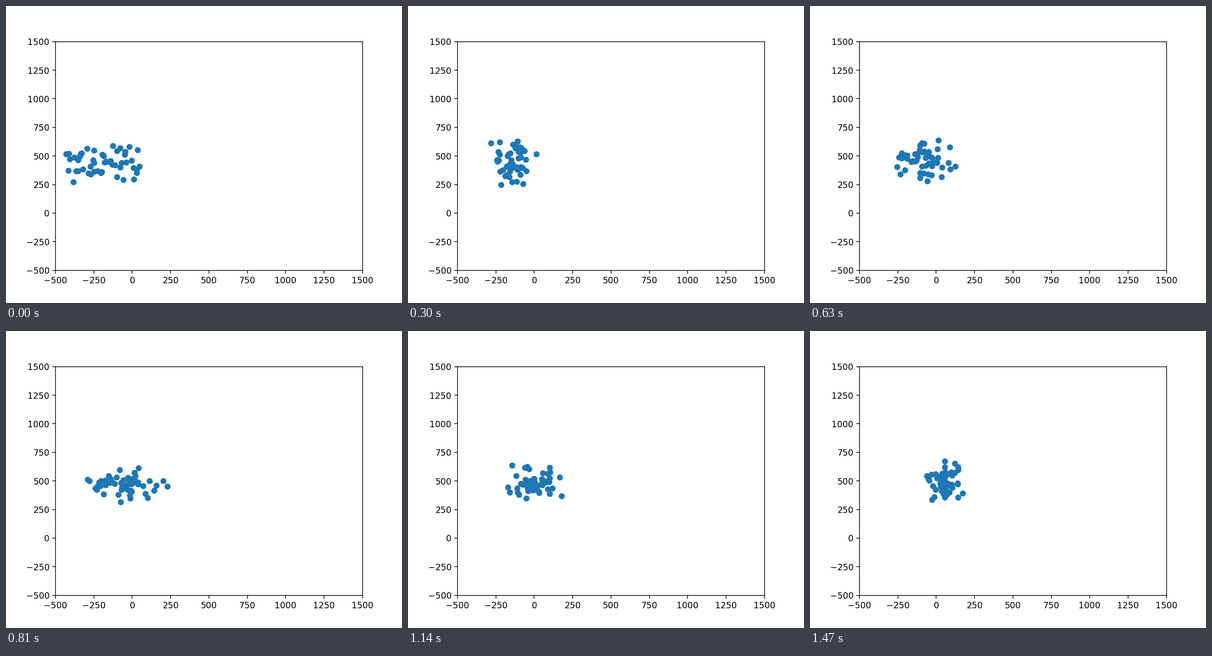
Animation of 864 by 648 pixels, one loop 1500 ms. Source, as a matplotlib script:

```python
import numpy as np
import matplotlib.pyplot as plt
from matplotlib.animation import FuncAnimation

BOIDS, STEPS, INTERVAL = 50, 50, 30
WARM_UP = 2
PULL, MATCH = 0.01, 0.125
NEAR, FLOCK = 10, 100

rng = np.random.default_rng(12)


def spread(low, high):
    """Evenly spread values with a little jitter, in random order."""
    cell = (high - low) / BOIDS
    return low + cell * (rng.permutation(BOIDS) + rng.random(BOIDS))


def step(pos, vel):
    """Cohesion, separation and speed matching, then move."""
    vel = vel + PULL * (pos.mean(axis=0) - pos)
    gap = pos[:, None] - pos[None]
    dist = np.hypot(gap[..., 0], gap[..., 1])[..., None]
    vel = vel + (gap * (dist < NEAR)).sum(axis=1)
    diff = vel[None] - vel[:, None]
    vel = vel + MATCH * (diff * (dist < FLOCK)).mean(axis=1)
    return pos + vel, vel


def fly():
    pos = np.column_stack([spread(-450, 50), spread(300, 580)])
    vel = np.column_stack([spread(0, 10), spread(-19, 21)])
    path = []
    for _ in range(WARM_UP + STEPS):
        path.append(pos)
        pos, vel = step(pos, vel)
    return path[WARM_UP:]


path = fly()
fig = plt.figure(figsize=(6.4, 4.8), dpi=135)
ax = plt.axes(xlim=(-500, 1500), ylim=(-500, 1500))
dots = ax.scatter(*path[0].T)


def draw(i):
    dots.set_offsets(path[i])
    return dots,


anim = FuncAnimation(fig, draw, frames=STEPS, interval=INTERVAL,
                     repeat=True, repeat_delay=0)
plt.show()
```
